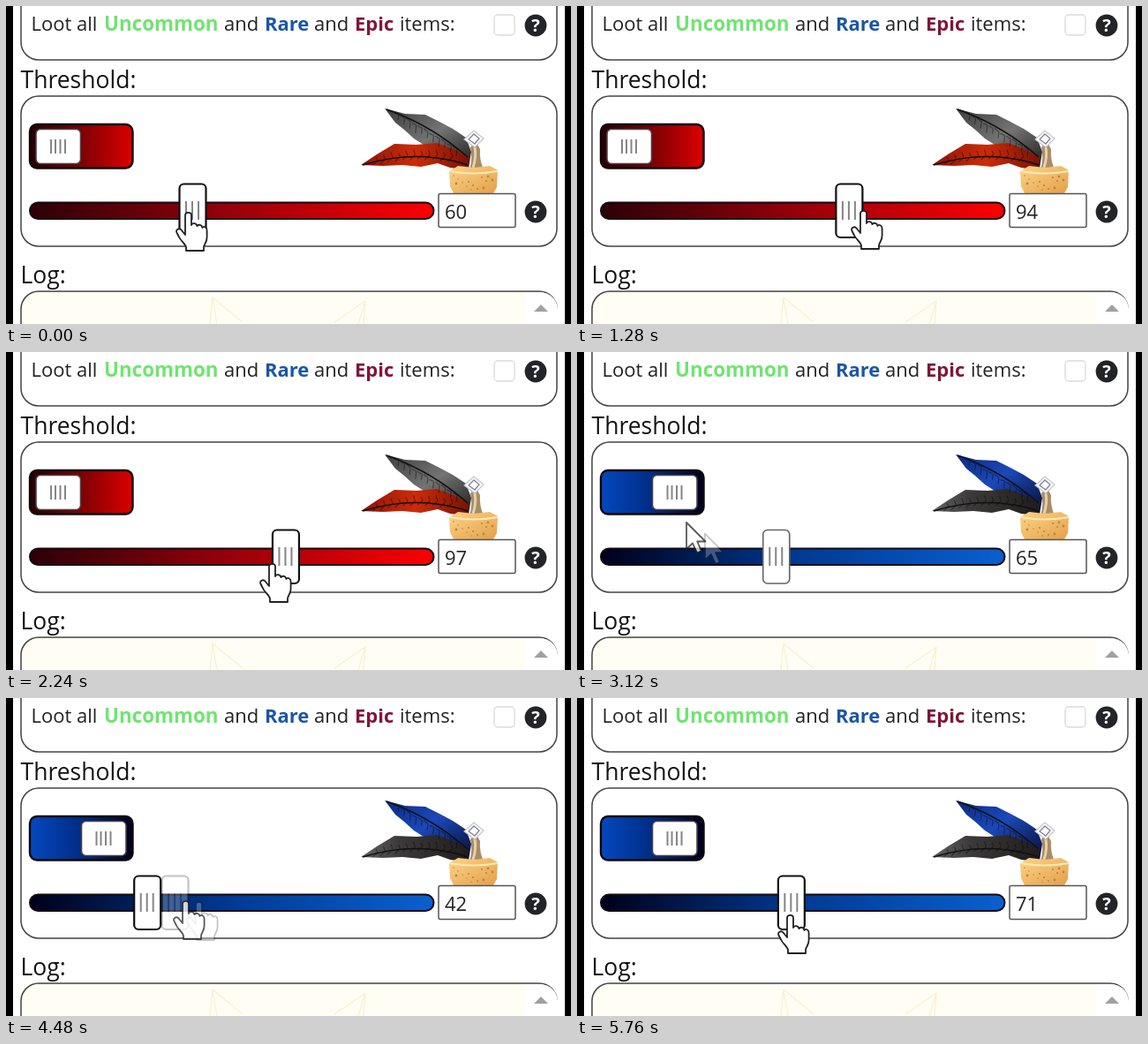
These frames come from a looping animation (640 px wide and 360 px high, 5840 ms). An HTML page:

```html
<!DOCTYPE html>
<html lang="en">
<head>
<meta charset="utf-8">
<title>Loot threshold</title>
<style>
html, body { margin: 0; width: 100%; height: 100%; overflow: hidden; background: #000; }
svg { display: block; width: 640px; height: 360px; font: 22px "Open Sans", "Noto Sans", sans-serif; fill: #222; }
.panel { fill: #fff; stroke: #444; stroke-width: 1.5; }
.head { font-size: 26.5px; font-weight: 500; fill: #141414; }
.b { font-weight: 700; }
.grip { stroke: #858585; stroke-width: 2; fill: none; }
.red { --upper: url(#grey); --lower: url(#fire); --box: url(#boxRed); --rail: url(#railRed); }
.blue { --upper: url(#sea); --lower: url(#dark); --box: url(#boxBlue); --rail: url(#railBlue); }
#upper { fill: var(--upper); }
#lower { fill: var(--lower); }
#box { fill: var(--box); }
#rail { fill: var(--rail); }
.barbs { fill: none; stroke: #000; stroke-opacity: .4; stroke-width: 1.2; }
.shaft { fill: none; stroke: #111; stroke-width: 1.6; }
</style>
</head>
<body>
<svg id="stage" class="red" viewBox="0 0 640 360">
  <defs>
    <linearGradient id="railRed"><stop stop-color="#2c0008"/><stop offset=".5" stop-color="#98000a"/><stop offset="1" stop-color="#fc0002"/></linearGradient>
    <linearGradient id="railBlue"><stop stop-color="#00001a"/><stop offset=".5" stop-color="#003a94"/><stop offset="1" stop-color="#0a60d0"/></linearGradient>
    <linearGradient id="boxRed"><stop stop-color="#240004"/><stop offset=".5" stop-color="#7c0004"/><stop offset="1" stop-color="#dc0000"/></linearGradient>
    <linearGradient id="boxBlue"><stop stop-color="#0448c0"/><stop offset=".5" stop-color="#002c84"/><stop offset="1" stop-color="#00001c"/></linearGradient>
    <linearGradient id="grey" x2="1" y2="1"><stop stop-color="#3c3c3c"/><stop offset=".5" stop-color="#747474"/><stop offset="1" stop-color="#1c1c1c"/></linearGradient>
    <linearGradient id="dark"><stop stop-color="#666"/><stop offset=".35" stop-color="#3c3a3a"/><stop offset="1" stop-color="#201c1c"/></linearGradient>
    <linearGradient id="fire"><stop stop-color="#8c1408"/><stop offset=".5" stop-color="#cc2c08"/><stop offset="1" stop-color="#7a1206"/></linearGradient>
    <linearGradient id="sea" x2="1" y2="1"><stop stop-color="#0a2a80"/><stop offset=".45" stop-color="#1c48b8"/><stop offset="1" stop-color="#080c30"/></linearGradient>
    <linearGradient id="cork" y2="1"><stop stop-color="#fcd488"/><stop offset="1" stop-color="#e4a04a"/></linearGradient>
    <path id="hand" d="M-4 25V2.8C-4-1.2 3-1.2 3 2.8V14C4 11.2 9 11.5 9.4 15.2C11 12.7 15 13.5 15.4 17C17 14.8 20.6 16.2 20.6 20V28C20.6 34 17.4 35.5 17 39V43H-3V39C-4 35-9 32-11 27.5L-13.6 22.5C-15 18.5-10.5 16.8-8 20Z"/>
    <path id="arrow" d="M0 0V30L7 23.5L12 34.5L17 32.3L12.2 21.5H21.5Z"/>
    <g id="help"><circle r="12.4" fill="#222428"/><text class="b" y="7.2" text-anchor="middle" font-size="20" fill="#fff">?</text></g>
  </defs>

  <path d="M8 0H633V360H8Z" fill="#fff"/>
  <rect class="panel" x="17" y="-60" width="607" height="121" rx="20"/>
  <rect class="panel" x="17" y="102" width="607" height="170" rx="20"/>
  <text x="28.5" y="28">Loot all</text>
  <text class="b" x="111" y="28" font-size="22.4" fill="#70e470">Uncommon</text>
  <text x="247" y="28">and</text>
  <text class="b" x="293" y="28" fill="#1c56a4">Rare</text>
  <text x="349" y="28">and</text>
  <text class="b" x="395" y="28" fill="#801638">Epic</text>
  <text x="446" y="28">items:</text>
  <rect x="553" y="10" width="23" height="23" rx="4" fill="#fff" stroke="#dcdcdc" stroke-width="1.4"/>
  <use href="#help" x="600" y="22"/>
  <text class="head" x="16.5" y="93">Threshold:</text>
  <text class="head" x="16.5" y="314">Log:</text>

  <rect class="panel" x="17" y="323" width="607" height="90" rx="20" style="fill:#fffdf4"/>
  <path d="M588 324H604Q623 325 625 343V360H588Z" fill="#fff"/>
  <path d="M598 346L606 338L614 346Z" fill="#a0a0a0"/>
  <path d="M234 330L231 360M234 330L239 360M234 330L268 358M407 334L372 358M407 334L399 360M407 334L405 360" fill="none" stroke="#f8f0d0" stroke-width="1.2"/>

  <path id="upper" d="M429 116L452 122L475 123L491 131L506 139L521 149L527 165L524 184L510 176L492 164L473 157L462 150L451 140L441 132Z"/>
  <path id="lower" d="M402 180L420 168L440 156L465 157L488 155L507 162L524 171L523 186L503 183L489 178L470 182L449 180L427 181Z"/>
  <path class="barbs" id="barbs"/>
  <path class="shaft" d="M431 117Q482 135 523 171M404 180Q466 161 523 180"/>
  <path d="M525 185Q529 172 526 160L532 153L537 162Q536 174 541 185Z" fill="#a98c66"/>
  <path d="M529 183Q533 171 531 160" fill="none" stroke="#e4d2ac" stroke-width="3"/>
  <path d="M519 151L530 141L541 150L531 160Z" fill="#fff" stroke="#c4c4cc" stroke-width="1.2"/>
  <path d="M524 151L530 145L536 150L531 156Z" fill="#fff" stroke="#84849c" stroke-width="1.3"/>
  <path d="M502 187L512 181L530 183L548 181L557 186L556 205L552 212H507L503 204Z" fill="url(#cork)"/>
  <path d="M503 187Q529 192 557 187" fill="none" stroke="#fbe8b0" stroke-width="2"/>
  <g id="specks" fill="#c08440"></g>

  <rect x="490" y="212.5" width="87" height="38" rx="2" fill="#fff" stroke="#555" stroke-width="1.5"/>
  <text id="num" x="497" y="240.5"></text>
  <use href="#help" x="600" y="233"/>

  <rect id="box" x="27" y="134" width="116.5" height="49.5" rx="8" stroke="#100808" stroke-width="2.4"/>
  <g id="knob">
    <rect x="34" y="139.5" width="50.5" height="39" rx="5" fill="#fff" stroke="#4a4044" stroke-width="1.6"/>
    <path class="grip" d="M51 151V167M56 151V167M61.5 151V167M67 151V167"/>
  </g>
  <rect id="rail" x="27" y="222.5" width="457.5" height="18.5" rx="9.2" stroke="#140a10" stroke-width="2"/>
  <g id="actors"></g>
</svg>
<script>
const $ = id => document.getElementById(id);
const STEP = 80, STEPS = 73, FLIP = 37;

// step, threshold, pointer x, pointer y
const keys = [
  [0, 60, 207, 234], [5, 34, 130, 236], [10, 48, 195, 233], [16, 94, 325, 232],
  [21, 128, 407, 235], [24, 122, 378, 237], [28, 97, 302, 240], [32, 65, 222, 234],
  [36, 65, 112, 160], [37, 65, 113, 162], [39, 65, 124, 193], [43, 65, 225, 231],
  [46, 62, 207, 231], [51, 28, 118, 232], [56, 42, 204, 230], [57, 53, 219, 231],
  [63, 118, 380, 237], [69, 73, 242, 246], [72, 71, 242, 246]
];

// Smooth path through the keys that never overshoots a turning point
function slope(i, c) {
  if (i === 0 || i === keys.length - 1) return 0;
  const [a, b, d] = [keys[i - 1], keys[i], keys[i + 1]];
  const l = (b[c] - a[c]) / (b[0] - a[0]), r = (d[c] - b[c]) / (d[0] - b[0]);
  return l * r <= 0 ? 0 : 2 * l * r / (l + r);
}

function at(step, c) {
  let i = 0;
  while (i < keys.length - 2 && keys[i + 1][0] <= step) i++;
  const a = keys[i], b = keys[i + 1], h = b[0] - a[0];
  const u = (step - a[0]) / h, v = 1 - u;
  return a[c] * v * v * (1 + 2 * u) + b[c] * u * u * (3 - 2 * u)
    + h * u * v * (slope(i, c) * v - slope(i + 1, c) * u);
}

function makeActor() {
  const g = document.createElementNS("http://www.w3.org/2000/svg", "g");
  g.innerHTML = `<g><rect x="-14.5" y="201.5" width="30" height="60.5" rx="5" fill="#fff"/>
    <path class="grip" d="M-7 221V242M0 221V242M7 221V242"/></g>
    <use fill="#fff" stroke="#222" stroke-width="1.8" stroke-linejoin="round"/>`;
  $("actors").append(g);
  const [thumb, cursor] = g.children;
  return { g, thumb, cursor, edge: thumb.firstElementChild };
}

function pose(actor, step) {
  const x = at(step, 2), y = at(step, 3), arrow = y > 185 && y < 220;
  const hover = y >= 220;
  actor.thumb.setAttribute("transform", `translate(${40 + 2.85 * Math.round(at(step, 1))})`);
  actor.edge.setAttribute("stroke", hover ? "#111" : "#666");
  actor.edge.setAttribute("stroke-width", hover ? 2.2 : 1.6);
  actor.cursor.setAttribute("href", arrow ? "#arrow" : "#hand");
  actor.cursor.setAttribute("transform", `translate(${x} ${y})`);
}

const ghost = makeActor(), main = makeActor();

function draw(step) {
  const blend = step % 17 === 5;
  const slide = Math.min(1, Math.max(0, (step - FLIP + 1) / 2));
  $("stage").setAttribute("class", step >= FLIP ? "blue" : "red");
  $("knob").setAttribute("transform", `translate(${51.5 * slide})`);
  $("num").textContent = Math.round(at(step, 1));
  pose(main, step);
  main.cursor.setAttribute("opacity", blend ? 0.75 : 1);
  ghost.g.setAttribute("opacity", blend ? 0.25 : 0);
  pose(ghost, Math.min(step + 1, STEPS - 1));
}

// Feather barbs and cork specks
let barbs = "";
for (let i = 0; i < 11; i++) {
  const x = 445 + i * 6.6, y = 123 + i * 3.9;
  barbs += `M${x} ${y}l-5 -${2 + i % 3}M${x} ${y}l-1 ${6 + i % 4}`;
  const p = 421 + i * 8.5, q = 175 - 7 * Math.sin(i / 4);
  barbs += `M${p} ${q}l-6 ${5 + i % 2}M${p} ${q}l-2 -${4 + i % 3}`;
}
$("barbs").setAttribute("d", barbs);
let specks = "";
for (let i = 0; i < 14; i++)
  specks += `<circle cx="${507 + i * 17 % 46}" cy="${192 + i * 7 % 17}" r="${0.8 + i % 3 * 0.3}"/>`;
$("specks").innerHTML = specks;

let start = null, last = -1;
function tick(now) {
  start ??= now;
  const step = Math.floor((now - start) / STEP) % STEPS;
  if (step !== last) draw(last = step);
  requestAnimationFrame(tick);
}
draw(0);
requestAnimationFrame(tick);
</script>
</body>
</html>
```
